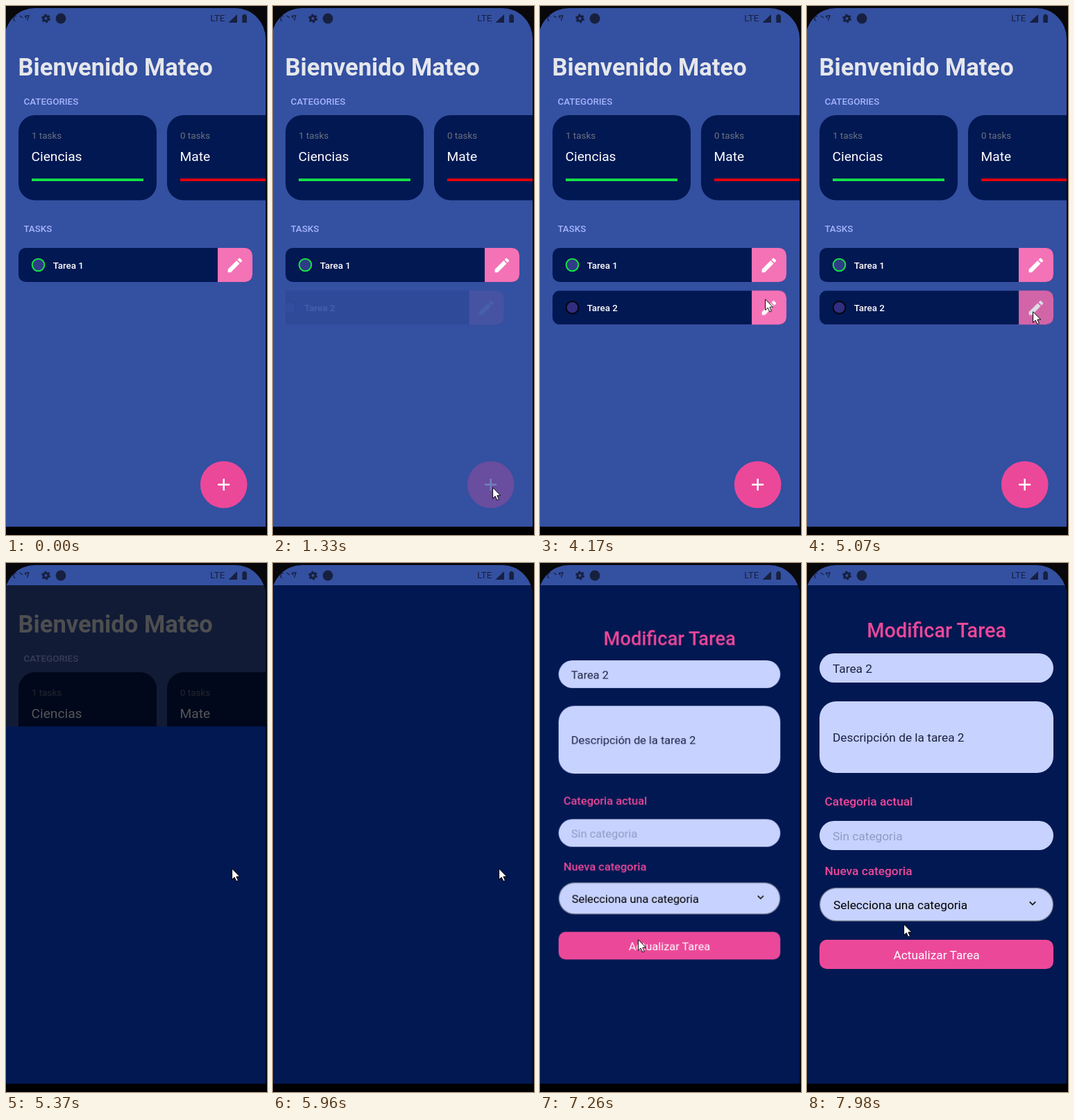
An HTML page for the animation above (8 s loop, 376 by 761 pixels).

```html
<!DOCTYPE html>
<html lang="es">
<head>
<meta charset="utf-8">
<title>Tareas</title>
<style>
  :root {
    --bg: #3450a1;
    --navy: #021852;
    --pink: #ec4899;
    --field: #c7d2fe;
    --ink: #17203f;
  }
  html, body { margin: 0; width: 100%; height: 100%; overflow: hidden; background: #000; }
  svg { display: block; width: 376px; height: 761px; }
  text { font: 400 13.4px Roboto, sans-serif; fill: #fff; }
  .m { font-weight: 500; }
  .hello { font-size: 34.6px; font-weight: 700; fill: #e5e7eb; }
  .head { font-weight: 500; fill: #a5b4fc; }
  .count { fill: #6b7280; }
  .name { font-size: 19.2px; }
  .navy { fill: var(--navy); }
  .status, .status text { fill: var(--ink); }
  .form text { font-size: 17.3px; fill: #1c2145; }
  .form .title { font-size: 28.8px; }
  .form .title, .form .label { font-weight: 500; fill: var(--pink); }
  .form .hint { fill: #929bc2; }
  .form .pick { fill: #000; }
  .form .action { fill: #fff; }
  .field { fill: var(--field); }
  .mid { text-anchor: middle; }

  .cursor, .fab, .task, .edit, .dim, .sheet, .form { animation: 8s infinite both; }
  .cursor { animation-name: cursor; animation-timing-function: linear; }
  /* quadratic in-out */
  .fab, .task, .edit, .form { animation-timing-function: cubic-bezier(.455, .03, .515, .955); }
  .dim, .sheet { animation-timing-function: ease; }
  .fab { animation-name: fab; }
  .task { animation-name: task; }
  .edit { animation-name: edit; }
  .dim { animation-name: dim; }
  .sheet { animation-name: sheet; }
  .form { animation-name: zoom; transform-origin: 186.5px 322.6px; }

  @keyframes cursor {
    0%, 2.8% { transform: translate(317px, 763px); animation-timing-function: ease-out; }
    9.9%, 28.4% { transform: translate(316px, 692px); animation-timing-function: ease-in; }
    33.875% { transform: translate(309px, 650px); }
    38.5% { transform: translate(293px, 522px); }
    46.2% { transform: translate(324px, 388px); }
    48.4%, 49.6% { transform: translate(324px, 403px); }
    52.1% { transform: translate(324px, 421px); }
    57.4%, 75% { transform: translate(325px, 439px); }
    79.8% { transform: translate(325px, 440px); }
    85.375% { transform: translate(137px, 476px); }
    89.5% { transform: translate(140px, 530px); }
    95% { transform: translate(144px, 578px); }
    99.7%, 100% { transform: translate(139px, 519px); }
  }
  @keyframes fab {
    0%, 14% { opacity: 1; }
    15.9% { opacity: .2; }
    19%, 100% { opacity: 1; }
  }
  @keyframes task {
    0%, 14.7% { opacity: 0; transform: translateX(-25px); }
    23.45%, 100% { opacity: 1; transform: none; }
  }
  @keyframes edit {
    0%, 59.3% { opacity: 1; }
    61.2% { opacity: .2; }
    64.3%, 100% { opacity: 1; }
  }
  @keyframes dim {
    0%, 63.9% { opacity: 0; }
    68.4%, 100% { opacity: .7; }
  }
  @keyframes sheet {
    0%, 63.95% { transform: translateY(717px); }
    71.45%, 100% { transform: none; }
  }
  @keyframes zoom {
    0%, 75% { transform: scale(0); }
    93.75%, 100% { transform: none; }
  }
</style>
</head>
<body>
<svg viewBox="0 0 376 761">
  <defs>
    <clipPath id="screen"><rect x="-2" y="3" width="376" height="800" rx="44"/></clipPath>
    <clipPath id="list"><rect x="18" y="340" width="337" height="300"/></clipPath>
    <clipPath id="row"><rect x="18" y="348" width="337" height="49" rx="10.5"/></clipPath>
    <path id="pencil" fill="#fff" d="M3 17.25V21h3.75L17.81 9.94l-3.75-3.75L3 17.25zM20.71 7.04a1 1 0 0 0 0-1.41l-2.34-2.34a1 1 0 0 0-1.41 0l-1.83 1.83 3.75 3.75 1.83-1.83z"/>
    <g id="pen">
      <rect x="305" y="348" width="50" height="49" fill="#f472b6"/>
      <use href="#pencil" transform="translate(316.2 359.2) scale(1.14)"/>
    </g>
  </defs>

  <rect width="376" height="761" fill="#08080a"/>
  <g clip-path="url(#screen)">
    <rect width="374" height="761" fill="var(--bg)"/>

    <text class="hello" x="17.5" y="99.7">Bienvenido Mateo</text>
    <text class="head" x="25.5" y="141.6">CATEGORIES</text>

    <rect class="navy" x="18" y="157" width="199" height="122.5" rx="24"/>
    <text class="count" x="37" y="190.8">1 tasks</text>
    <text class="name" x="36.5" y="223.2">Ciencias</text>
    <rect x="37" y="248.2" width="161" height="3.8" fill="#14e146"/>

    <rect class="navy" x="232" y="157" width="199" height="122.5" rx="24"/>
    <text class="count" x="251" y="190.8">0 tasks</text>
    <text class="name" x="250.5" y="223.2">Mate</text>
    <rect x="251" y="248.2" width="161" height="3.8" fill="#e6000c"/>

    <text class="head" x="25.5" y="324.8">TASKS</text>
    <g clip-path="url(#row)">
      <rect class="navy" x="18" y="348" width="337" height="49"/>
      <use href="#pen"/>
    </g>
    <circle cx="46.5" cy="372.5" r="8.8" fill="#2f3c86" stroke="#14e146" stroke-width="2"/>
    <text class="m" x="67.7" y="377.8">Tarea 1</text>

    <g clip-path="url(#list)">
      <g class="task">
        <g transform="translate(0 61.3)">
          <g clip-path="url(#row)">
            <rect class="navy" x="18" y="348" width="337" height="49"/>
            <g class="edit"><use href="#pen"/></g>
          </g>
          <circle cx="46.5" cy="372.5" r="8.8" fill="#312e81" stroke="#050611" stroke-width="2"/>
          <text class="m" x="67.7" y="377.8">Tarea 2</text>
        </g>
      </g>
    </g>

    <g class="fab">
      <circle cx="313.7" cy="688.5" r="33.8" fill="var(--pink)"/>
      <path d="M305.2 688.5h17M313.7 680v17" stroke="#fff" stroke-width="2.5"/>
    </g>

    <rect class="dim" y="32" width="374" height="717"/>
    <rect class="sheet navy" y="32" width="374" height="717"/>

    <g class="form">
      <text class="title mid" x="186.7" y="107">Modificar Tarea</text>
      <rect class="field" x="18" y="130" width="337" height="42" rx="21"/>
      <text x="37" y="157.7">Tarea 2</text>
      <rect class="field" x="18" y="199" width="337" height="103" rx="24"/>
      <text x="37" y="257">Descripción de la tarea 2</text>
      <text class="label" x="25.5" y="349">Categoria actual</text>
      <rect class="field" x="18" y="371" width="337" height="42" rx="21"/>
      <text class="hint" x="37" y="399">Sin categoria</text>
      <text class="label" x="25.5" y="449">Nueva categoria</text>
      <rect class="field" x="18.6" y="467.6" width="335.8" height="47.3" rx="23.6" stroke="#757d93" stroke-width="1.2"/>
      <text class="pick" x="38" y="497.8">Selecciona una categoria</text>
      <path d="M320.7 487.3l4.3 4.3 4.3-4.3" fill="none" stroke="#111" stroke-width="1.7"/>
      <rect x="18" y="542" width="337" height="42" rx="10.5" fill="var(--pink)"/>
      <text class="action mid" x="186.5" y="570">Actualizar Tarea</text>
    </g>

    <g class="status">
      <path d="M7 15.5l8-1.2M11.3 15v5.5l2 1.2M19.5 14l4.5 3M27 14.5l6-.7-2.5 7.2M27 14.5l2.5 3" fill="none" stroke="var(--ink)" stroke-width="1.3"/>
      <circle cx="57.5" cy="18" r="3.5" fill="none" stroke="var(--ink)" stroke-width="3.2"/>
      <circle cx="57.5" cy="18" r="5.5" fill="none" stroke="var(--ink)" stroke-width="2" stroke-dasharray="2.88 2.88"/>
      <circle cx="79" cy="18" r="7.4"/>
      <text x="294.3" y="22.2">LTE</text>
      <path d="M321 24V23.5L333 12V24z"/>
      <path d="M340.3 13.2h1.8v-1.4h3v1.4h1.8V24h-6.6z"/>
    </g>
  </g>
  <rect y="749" width="376" height="12"/>

  <path class="cursor" d="M.6.8V16.4l3.6-3.3 2.6 5.7 2.6-1.1-2.5-5.6h4.8z" fill="#fff" stroke="#000" stroke-width="1"/>
</svg>
</body>
</html>
```
